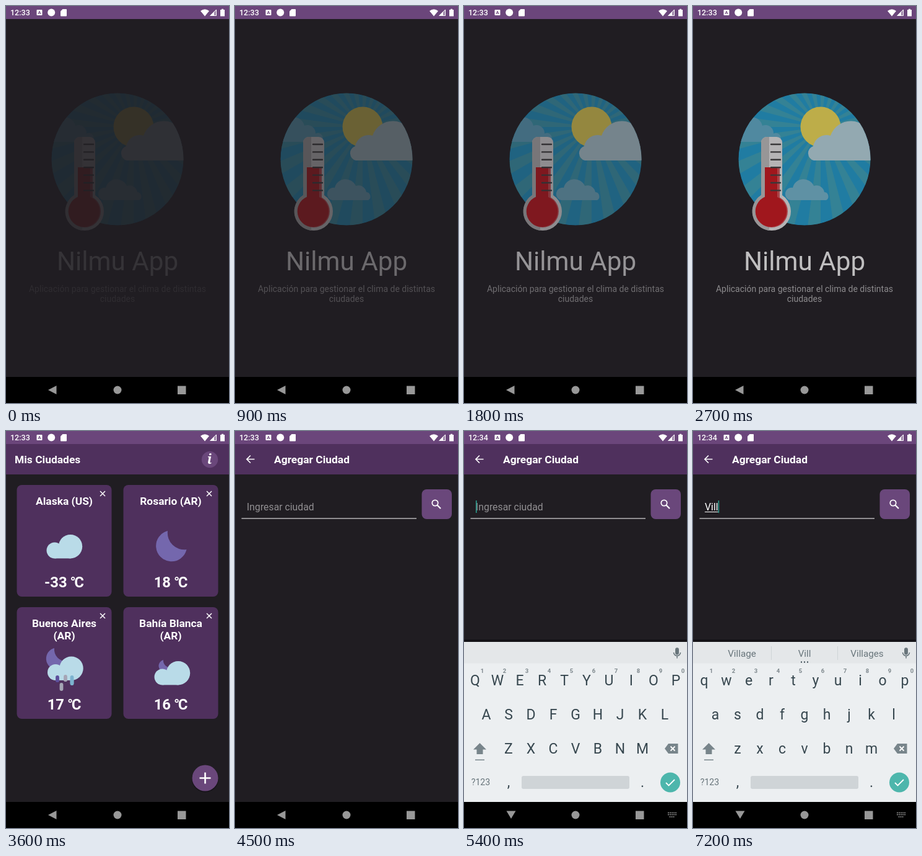
These frames come from a looping animation (360x640 px, 8000 ms). An HTML page:

```html
<!DOCTYPE html>
<html lang="es">
<meta charset="utf-8">
<title>Clima</title>
<style>
  html, body { margin: 0; width: 100%; height: 100%; overflow: hidden; background: #201d22; }
  svg { display: block; width: 100vw; height: 100vh; }
  text { font-family: Roboto, "Noto Sans CJK JP", sans-serif; fill: #fff; }
  .mid { text-anchor: middle; }
  .bold { font-weight: 700; font-size: 17.42px; }
  .temp { font-weight: 700; font-size: 23.8px; }
  .line { fill: none; stroke: #fff; }
  #keyboard text { fill: #37474f; }
  #keyboard .key { font-size: 23px; }
  #keyboard .hint { font-size: 9.5px; font-weight: 700; fill: #7d878c; }
  #keyboard .word { font-size: 15.2px; fill: #68757b; }
</style>
<svg viewBox="0 0 360 640">
  <defs>
    <clipPath id="disc"><circle cx="180" cy="247" r="106.5"/></clipPath>
    <g id="cloud" fill="#b9dbe8">
      <circle cx="13" cy="25.5" r="13"/><circle cx="38.5" cy="19.2" r="19.2"/>
      <path d="M13 20h26v18.4H13z"/>
    </g>
    <path id="moon" fill="#7467ad" d="M20 0A25 25 0 1 0 50.5 30A27 27 0 0 1 20 0z"/>
    <path id="close" class="line" stroke-width="1.5" d="M-4-4 4 4M4-4-4 4"/>
  </defs>
  <rect width="360" height="640" fill="#201d22"/>

  <g id="splash">
    <g clip-path="url(#disc)">
      <circle cx="180" cy="247" r="107" fill="#21a2d6"/>
      <circle cx="206" cy="195" r="110" fill="none" stroke="#8fc088" stroke-opacity=".25" stroke-width="220" pathLength="48" stroke-dasharray="1"/>
      <circle cx="206" cy="195" r="32.5" fill="#fbe65a"/>
      <path fill="#63b4d3" d="M60 219V190h18a18 18 0 0 1 34 3a13 13 0 0 1 18 13a7 7 0 0 1 8 13z"/>
      <path fill="#c0e0ea" d="M195 249a12 12 0 0 1-1-23A22 22 0 0 1 222 209A34.5 34.5 0 0 1 288 211L300 249z"/>
      <path fill="#78bfd8" d="M157 313a10 10 0 0 1 4-20a18 18 0 0 1 34-3a13 13 0 0 1 17 10a7 7 0 0 1 3 13z"/>
    </g>
    <circle cx="127" cy="331" r="31" fill="#f0f0f0"/>
    <rect x="110" y="211" width="34" height="110" rx="9" fill="#f0f0f0"/>
    <path fill="#c6c6c6" d="M123 211h-4a9 9 0 0 0-9 9v85a31 31 0 0 0 13 57z"/>
    <circle cx="127" cy="331" r="26" fill="#e2545a"/>
    <path fill="#e2545a" d="M117 260h23v50h-23z"/>
    <path fill="#d3151d" d="M116 260h20v48a25 25 0 0 1-9 48a25 25 0 0 1-11-48z"/>
    <path stroke="#444" stroke-width="2.4" stroke-linecap="round" d="M126 223h15m-15 12.4h15m-15 12.4h15m-15 12.4h15m-15 12.4h15m-15 12.4h15m-15 12.4h15"/>
    <text class="mid" x="180" y="426" font-size="42.2">Nilmu App</text>
    <g class="mid" font-size="14" opacity=".68">
      <text x="180" y="461">Aplicación para gestionar el clima de distintas</text>
      <text x="180" y="477">ciudades</text>
    </g>
  </g>

  <path id="header" fill="#4f305d" d="M0 21h360v49H0z"/>

  <g id="cities">
    <text class="bold" x="14" y="52.2">Mis Ciudades</text>
    <circle cx="329" cy="46" r="13.2" fill="#6a477b"/>
    <text class="mid" x="328.5" y="53" style="font:italic 700 21px 'Noto Serif',serif">i</text>
    <g id="cards"></g>
    <use href="#cloud" x="65.5" y="167"/>
    <use href="#moon" x="241" y="161"/>
    <use href="#moon" transform="translate(64 350) scale(.7)"/>
    <g stroke-width="5.8" stroke-linecap="round">
      <path stroke="#5d4f9c" d="M83 396v6"/>
      <path stroke="#a5a5b5" d="M96 396v5M89.5 409v7"/>
      <path stroke="#7cb3cf" d="M106.500 396v11"/>
    </g>
    <use href="#cloud" x="67" y="363.500"/>
    <g stroke-width="5.8" stroke-linecap="round">
      <path stroke="#5d4f9c" d="M83 397v5"/>
      <path stroke="#a5a5b5" d="M96 396v5"/>
      <path stroke="#7cb3cf" d="M106.500 397v10"/>
    </g>
    <use href="#moon" transform="translate(246 369) scale(.4)"/>
    <use href="#cloud" x="239.500" y="371"/>
    <circle cx="321.500" cy="561" r="21.500" fill="#17141a"/>
    <circle cx="321.500" cy="559.500" r="21" fill="#6a477b"/>
    <path class="line" stroke-width="2.6" d="M312.500 559.500h18m-9-9v18"/>
  </g>

  <g id="search">
    <path class="line" stroke-width="1.7" d="M31.500 45.500H19m6-6-6 6 6 6"/>
    <text class="bold" x="63" y="52.2">Agregar Ciudad</text>
    <path class="line" stroke="#ddd" stroke-width="1.2" d="M10.500 141H293"/>
    <rect x="301.500" y="94" width="48.500" height="48" rx="8" fill="#6a477b"/>
    <circle class="line" cx="323" cy="116" r="4.700" stroke-width="1.8"/>
    <path class="line" stroke-width="2.200" d="m326.500 119.500 5.500 5.500"/>
    <text id="entry" x="19" y="128" font-size="15.8"></text>
    <path id="underline" class="line" stroke-width="1"/>
    <path id="caret" fill="#2a9d8f" d="M0 112h1.600v20H0z"/>
  </g>

  <g id="keyboard">
    <path fill="#141217" d="M0 336h360v4H0z"/>
    <path fill="#eceff1" d="M0 340h360v258H0z"/>
    <path fill="#e4e7e9" d="M0 340h360v34.500H0z"/>
    <g id="words">
      <path stroke="#cfd4d7" d="M126.500 347v22m107-22v22"/>
      <path stroke="#37474f" stroke-width="2" stroke-dasharray="2 3" d="M174 372.500h12"/>
      <text class="word mid" x="79" y="364"></text>
      <text class="word mid" x="180" y="364"></text>
      <text class="word mid" x="281" y="364"></text>
    </g>
    <g fill="none" stroke="#68757b" stroke-width="1.500">
      <rect x="341.800" y="350" width="4.400" height="10" rx="2.200" fill="#68757b"/>
      <path d="M338.500 357a5.500 5.500 0 0 0 11 0M344 362v4.500"/>
    </g>
    <g id="keys"></g>
    <path fill="#78858b" d="m25.500 503 10.500 10.500h-5.500v7.500h-10v-7.500H15zM18 529.500h15v1.500H18z"/>
    <path fill="#78858b" d="M324 512l6-8h15.500v16H330z"/>
    <path class="line" stroke="#eceff1" stroke-width="1.800" d="m333.500 508.500 7 7m0-7-7 7"/>
    <text class="mid" x="27" y="571" font-size="14.200" style="fill:#68757b">?123</text>
    <rect x="93" y="556" width="174" height="21" rx="3" fill="#cfd4d7"/>
    <circle cx="333" cy="566.500" r="16" fill="#4db6ac"/>
    <path class="line" stroke-width="1.800" d="m326 567 4.500 4.500 9.500-9.500"/>
  </g>

  <path fill="#6b467b" d="M0 0h360v21H0z"/>
  <text id="clock" x="7" y="15" font-size="12.500" font-weight="500"></text>
  <g fill="#fff">
    <rect x="49.500" y="6" width="9" height="9" rx="1"/>
    <text class="mid" x="54" y="13.300" font-size="7.500" font-weight="700" style="fill:#6b467b">A</text>
    <circle cx="73.200" cy="10.500" r="6"/>
    <path d="M91.500 5H97a1 1 0 0 1 1 1v9.500a1 1 0 0 1-1 1H89a1 1 0 0 1-1-1V8.500z"/>
    <path d="M314 8q7-5.500 14 0l-7 8.500z"/>
    <path d="M340 5v11h-11z" opacity=".35"/>
    <path d="M336 9v7h-7z"/>
    <path class="line" d="M339.500 6v9.500h-9.300z"/>
    <path d="M346 6h2V4.800h3V6h2v10.500h-7z"/>
  </g>

  <path d="M0 598h360v42H0z"/>
  <g fill="#989898">
    <path id="back" d="M68 619 81.500 612v14z"/>
    <circle cx="180" cy="619" r="6.500"/>
    <path d="M277 612.500h13.500V626H277z"/>
    <path id="switcher" fill="none" stroke="#989898" stroke-width="1.600" stroke-dasharray="2 1" d="M329 615.500h14m-14 3h14M331.500 622h9"/>
  </g>
</svg>
<script>
const $ = id => document.getElementById(id);
const show = (id, on) => $(id).style.display = on ? '' : 'none';
const label = (x, y, cls, s) => `<text class="${cls}" x="${x}" y="${y}">${s}</text>`;

const cities = [['Alaska (US)', -33], ['Rosario (AR)', 18], ['Buenos Aires|(AR)', 17], ['Bahía Blanca|(AR)', 16]];
$('cards').innerHTML = cities.map(([name, temp], i) => {
  const x = 17.5 + i % 2 * 172, y = 87 + (i >> 1) * 197, mid = x + 76.5;
  return `<rect x="${x}" y="${y}" width="153" height="180" rx="8" fill="#4f305d"/>
    <use href="#close" x="${x + 138.5}" y="${y + 14}"/>` +
    name.split('|').map((s, n) => label(mid, y + 32 + n * 20, 'bold mid', s)).join('') +
    label(mid, y + 165, 'temp mid', temp + ' ℃');
}).join('');

function drawKeys(upper) {
  const rows = [['qwertyuiop', 18], ['asdfghjkl', 36], ['zxcvbnm', 72]];
  $('keys').innerHTML = rows.map(([letters, x], r) =>
    [...letters].map((c, i) => label(x + i * 36, 410 + r * 55, 'key mid', upper ? c.toUpperCase() : c) +
      (r ? '' : label(x + 11.5 + i * 36, 390, 'hint mid', (i + 1) % 10))).join('')).join('') +
    label(72, 574, 'key mid', ',') + label(288, 574, 'key mid', '.');
}

const STEP = 900, LOOP = 8000;
const fade = [.1, .34, .53, .72];
const typed = { 6: '', 7: 'Vi', 8: 'Vill' };
const suggestions = { 7: ['Via', 'Vi', 'Video'], 8: ['Village', 'Vill', 'Villages'] };

function draw(step) {
  const typing = step >= 6, text = typed[step] || '', words = suggestions[step];
  show('splash', step < 4);
  $('splash').setAttribute('opacity', fade[step] ?? 1);
  show('header', step >= 4);
  show('cities', step === 4);
  show('search', step >= 5);
  show('keyboard', typing);
  show('switcher', typing);
  show('caret', typing);
  show('words', words);
  $('clock').textContent = typing ? '12:34' : '12:33';
  $('back').setAttribute('d', typing ? 'M68.500 612.500h15L76 625z' : 'M68 619 81.500 612v14z');
  drawKeys(!text);
  if (words) document.querySelectorAll('#words text').forEach((el, i) => el.textContent = words[i]);
  const entry = $('entry');
  entry.textContent = text || 'Ingresar ciudad';
  entry.style.fill = text ? '#fff' : '#918f92';
  const end = 19 + (text && step >= 5 ? entry.getComputedTextLength() : 0);
  $('underline').setAttribute('d', text ? `M19 130.500H${end}` : '');
  $('caret').setAttribute('transform', `translate(${end})`);
}

let last = -1;
function tick() {
  const step = Math.floor(performance.now() % LOOP / STEP);
  if (step !== last) draw(last = step);
  requestAnimationFrame(tick);
}
tick();
</script>
</html>
```
